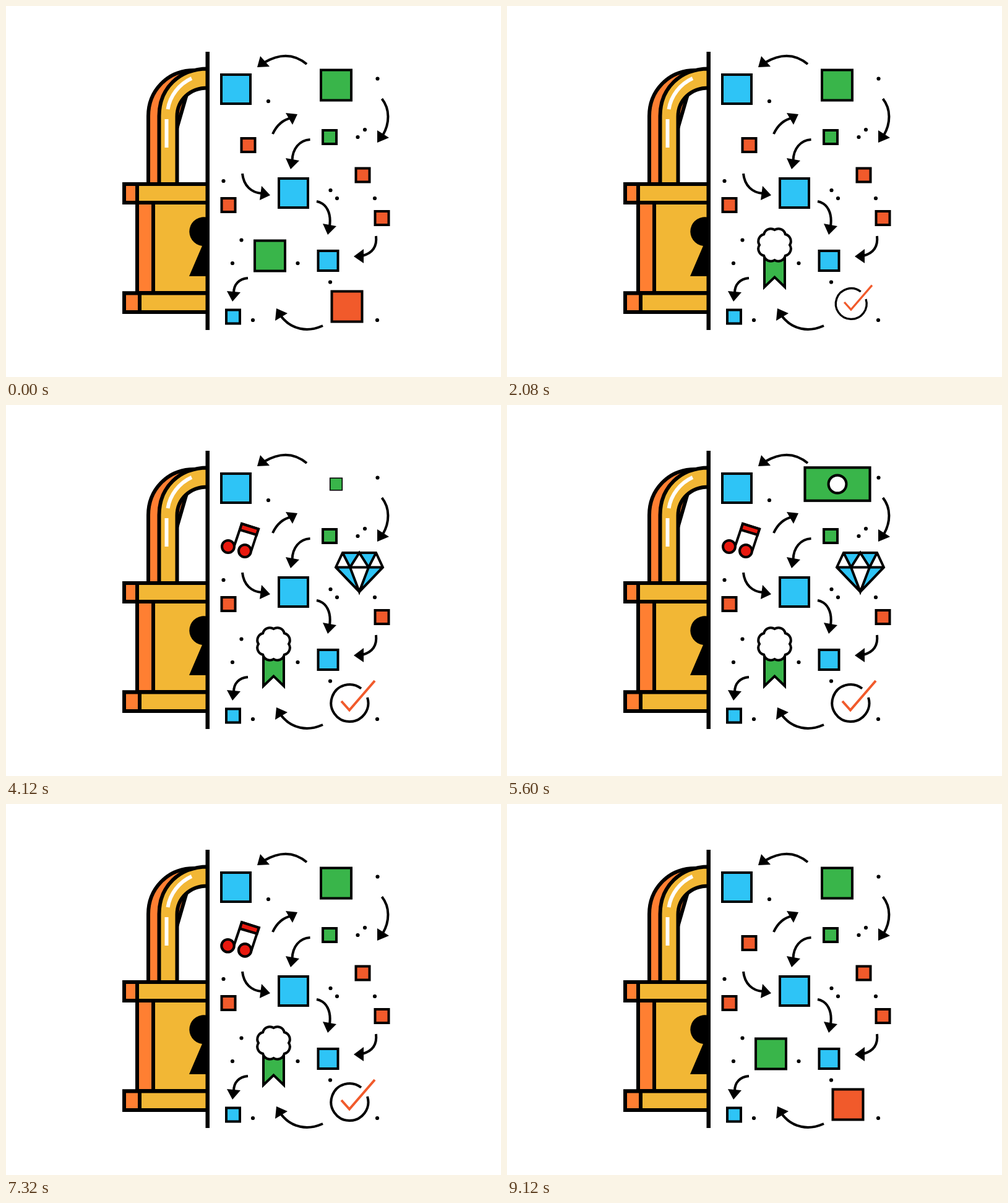
These frames come from a looping animation (800 by 600 pixels, 9.16 s). An HTML page:

```html
<!DOCTYPE html>
<html lang="en">
<head>
<meta charset="utf-8">
<title>Padlock and data</title>
<style>
  html, body { margin: 0; width: 100%; height: 100%; overflow: hidden; background: #fff; }
  svg { display: block; width: 800px; height: 600px; }
  .line { fill: none; stroke: #000; stroke-width: 4; }
  .lock { stroke: #000; stroke-width: 6; }
  .yellow { fill: #f2b735; }
  .orange { fill: #ff7f32; }
  .blue { fill: #2ec4f6; }
  .green { fill: #39b54a; }
  .red { fill: #f15a2b; }
  .white { fill: #fff; }
  .note { fill: #e9190f; }
  .edge { stroke: #000; stroke-width: 4; }
  .shine { fill: none; stroke: #fff; stroke-width: 6; }
</style>
</head>
<body>
<svg viewBox="0 0 800 600">
  <g class="lock">
    <path class="orange" d="M230 288V178C230 138 260 104 304 104L290 150L250 288Z"/>
    <path class="yellow" d="M247.500 288V178C247.500 133 280 101.500 326 101.500V132.500C297 132.500 276.500 152 276.500 179V288Z"/>
    <path class="yellow" d="M212 318H326V464H212Z"/>
    <path class="orange" d="M212 318H238V464H212Z"/>
    <path class="yellow" d="M191 288H326V318H191ZM191 464.500H326V495H191Z"/>
    <path class="orange" d="M191 288H212V318H191ZM191 464.500H216V495H191Z"/>
  </g>
  <path class="shine" d="M259.500 183V229M261.500 167C265 145 280 126 300 117"/>
  <path d="M326 342A23.500 23.500 0 1 0 317 388L296 437H326Z"/>
  <rect x="322.500" y="74" width="6.500" height="450"/>
  <g id="arrows"></g>
  <g id="dots"></g>
  <g id="squares"></g>

  <g id="badge">
    <path class="green edge" d="M416 405V454.500L432.500 438.500L449 454.500V405Z"/>
    <path id="rosette" class="white edge"/>
  </g>
  <g id="check">
    <path class="line" d="M584 473A30 30 0 1 1 574 458.500"/>
    <path d="M542 479L555 493.500L596 446" fill="none" stroke="#f15a2b" stroke-width="4"/>
  </g>
  <g id="music">
    <path class="white edge" d="M368.500 229L381 192L408 200.500L396 237" fill="none"/>
    <path class="note edge" d="M381 192L408 200.500L405 210L378 202Z"/>
    <circle class="note edge" cx="359" cy="229" r="10"/>
    <circle class="note edge" cx="386" cy="236" r="10"/>
  </g>
  <g id="gem">
    <path class="white" d="M544 239H598L609 262.500L571 302L533 262.500Z"/>
    <path class="blue" d="M544 239H571L556 262.500ZM571 239H598L586 262.500ZM533 262.500H556L571 302ZM586 262.500H609L571 302Z"/>
    <path class="line" d="M544 239H598L609 262.500L571 302L533 262.500ZM533 262.500H609M544 239L556 262.500L571 239L586 262.500L598 239M556 262.500L571 302L586 262.500"/>
  </g>
  <g id="bill">
    <rect class="green edge" x="483" y="102" width="102" height="52"/>
    <circle class="white edge" cx="534" cy="128" r="14"/>
  </g>
</svg>
<script>
const $ = id => document.getElementById(id);

function add(parent, tag, attrs) {
  const el = document.createElementNS("http://www.w3.org/2000/svg", tag);
  for (const k in attrs) el.setAttribute(k, attrs[k]);
  return parent.appendChild(el);
}

// Shaft, then arrow head
const arrows = [
  ["M486 94Q456 69 418 91", "406,99 411,81 426,98"],
  ["M431 207C437 194 447 184 461 181", "471,175 452,173 463,192"],
  ["M607.500 150C621 167 620 190 609 209", "600,221 600,201 619,213"],
  ["M491.500 216C474 217 463 231 462.500 250", "460,264 452,246 474,250"],
  ["M382 271C384 291 397 302 413 303", "427,306 413,291 410,314"],
  ["M502 316C518 319 526 335 523 356", "520,370 512,352 534,356"],
  ["M598 372C600 390 591 400 576 404", "562,405 578,393 578,416"],
  ["M391 440C377 441 368 450 368 464", "366,478 357,461 379,463"],
  ["M512 517C488 528 461 524 444 501", "437,489 455,497 435,509"]
];
for (const [shaft, head] of arrows) {
  add($("arrows"), "path", { class: "line", d: shaft });
  add($("arrows"), "polygon", { points: head });
}

const dots = "600.5,117.5 424,154 580,200 568.5,212 351.5,283 524.5,298 535,311 596,311 380.5,378.5 366,416 471.5,416 524,446.5 399,508 600,508";
for (const dot of dots.split(" ")) {
  const [cx, cy] = dot.split(",");
  add($("dots"), "circle", { cx, cy, r: 3.1 });
}

function square(x, y, size, color) {
  const side = size - 4;
  return add($("squares"), "rect", {
    class: color + " edge", x: x - side / 2, y: y - side / 2, width: side, height: side
  });
}
square(371.5, 134.5, 51, "blue");
square(523, 212, 26, "green");
square(464.5, 302.5, 51, "blue");
square(359.5, 322, 26, "red");
square(607.5, 343, 26, "red");
square(520.5, 412, 36, "blue");
square(367, 502.5, 26, "blue");

// Eight lobes around the badge centre
let lobes = "";
for (let i = 0; i <= 8; i++) {
  const a = (i - 2) * Math.PI / 4;
  const p = (432.5 + 24.5 * Math.cos(a)).toFixed(2) + " " + (386.5 + 24.5 * Math.sin(a)).toFixed(2);
  lobes += i ? "A11.5 11.5 0 0 1 " + p : "M" + p;
}
$("rosette").setAttribute("d", lobes + "Z");

// Each square turns into an icon: start time, square, icon, icon centre
const swap = (start, x, y, size, color, id, ix, iy) =>
  ({ start, x, y, ix, iy, box: square(x, y, size, color), icon: $(id) });
const swaps = [
  swap(1000, 426.5, 404, 53, "green", "badge", 432.5, 405),
  swap(1680, 551, 486, 53, "red", "check", 560.5, 479),
  swap(2360, 391.5, 225, 26, "red", "music", 379, 219.5),
  swap(3160, 576.5, 273.5, 26, "red", "gem", 571, 270.5),
  swap(3880, 533.5, 128, 53, "green", "bill", 534, 128)
];

// Time in ms and scale
const boxSteps = [[0, 1], [120, 1.35], [240, 0.4], [280, 0]];
const iconSteps = [[240, 0], [320, 0.48], [400, 0.83], [480, 1.22], [520, 1.14], [600, 1.06], [680, 1]];

function sample(steps, t) {
  if (t <= steps[0][0]) return steps[0][1];
  for (let i = 1; i < steps.length; i++) {
    const [t0, v0] = steps[i - 1], [t1, v1] = steps[i];
    if (t < t1) return v0 + (v1 - v0) * (t - t0) / (t1 - t0);
  }
  return steps[steps.length - 1][1];
}

function zoom(el, x, y, s) {
  el.style.display = s > 0 ? "" : "none";
  el.setAttribute("transform", `translate(${x} ${y}) scale(${s}) translate(${-x} ${-y})`);
}

const LOOP = 9160, TURN = 5560, MIRROR = 10120, STEP = 40;

function draw(now) {
  let t = Math.floor((now % LOOP) / STEP) * STEP;
  if (t > TURN) t = MIRROR - t;
  for (const s of swaps) {
    zoom(s.box, s.x, s.y, sample(boxSteps, t - s.start));
    zoom(s.icon, s.ix, s.iy, sample(iconSteps, t - s.start));
  }
}

const begin = performance.now();
function tick() {
  draw(performance.now() - begin);
  requestAnimationFrame(tick);
}
tick();
</script>
</body>
</html>
```
